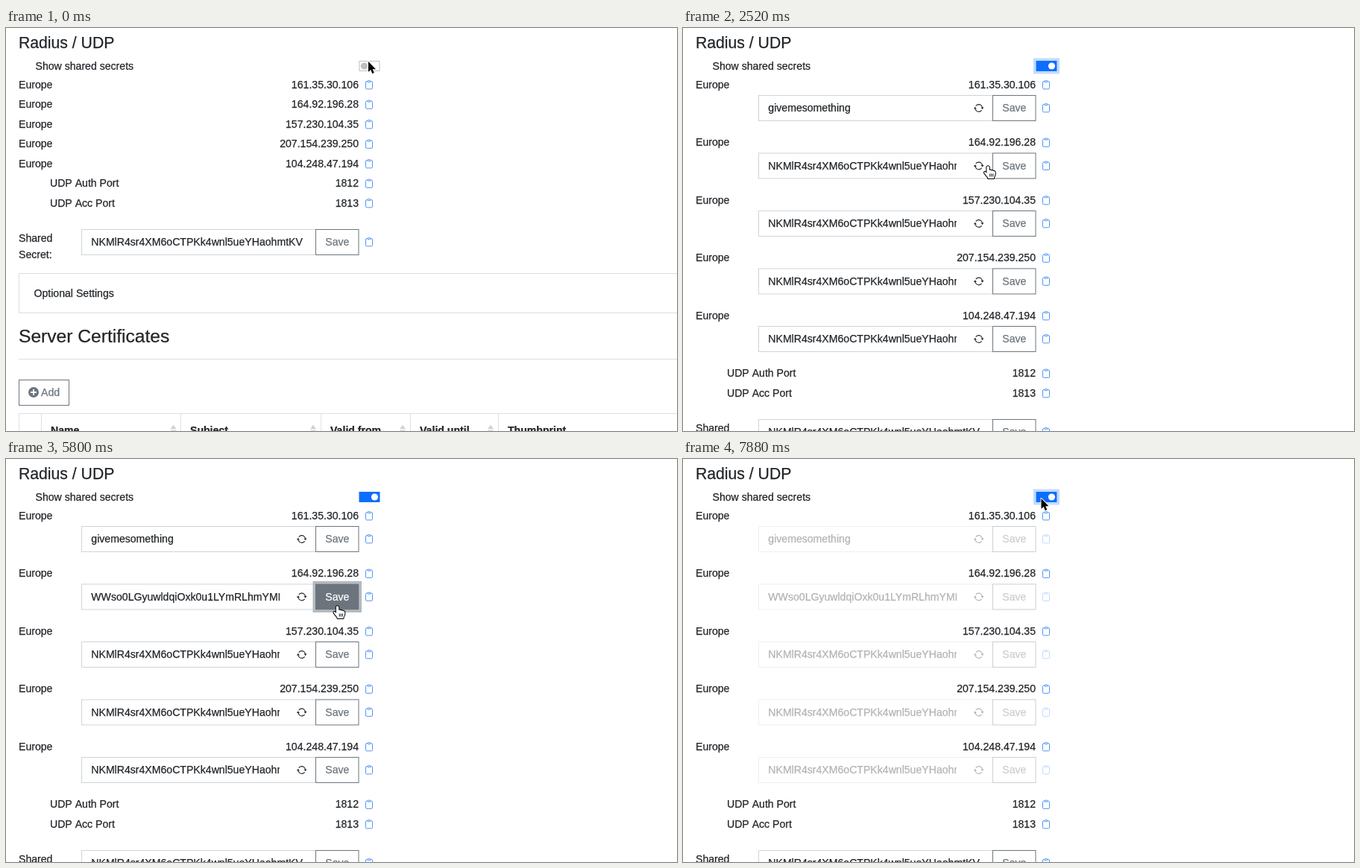
These frames come from a looping animation (900 px wide and 541 px high, 8000 ms). An HTML page with a canvas:

```html
<!DOCTYPE html>
<html lang="en">
<head>
<meta charset="utf-8">
<title>Radius shared secrets</title>
<style>
html, body { margin: 0; width: 100%; height: 100%; overflow: hidden; background: #fff; }
canvas { display: block; width: 900px; height: 541px; }
</style>
</head>
<body>
<canvas id="stage"></canvas>
<script>
const W = 900, H = 541, LOOP = 8000;
const canvas = document.getElementById('stage');
const g = canvas.getContext('2d');
const dpr = window.devicePixelRatio || 1;
canvas.width = W * dpr;
canvas.height = H * dpr;

const INK = '#212529', GREY = '#6c757d', BLUE = '#0d6efd', LINE = '#ced4da', PALE = '#dee2e6';
const BLUE_RING = '#c2dbfe', GREY_RING = '#b5babe';
const SECRET = 'NKMlR4sr4XM6oCTPKk4wnl5ueYHaohmtKV';
const FRESH = 'WWso0LGyuwldqiOxk0u1LYmRLhmYMBkT';
const HOSTS = ['161.35.30.106', '164.92.196.28', '157.230.104.35', '207.154.239.250', '104.248.47.194'];

// Moments of the interaction, in ms
const OPEN = 740, RENEW = 2970, FOCUS = 4320, SELECT = 4460;
const HOVER = 5504, SAVE = 5652, CLOSE = 6400, REOPEN = 7880;

// Pointer moves: start, end, number of steps, way points
const MOVES = [
  [0, 0, 1, [[486, 45, arrow]]],
  [290, 440, 2, [[484, 48, arrow], [483, 51, arrow]]],
  [1480, 2520, 8, [[482, 47, arrow], [470, 33, arrow], [400, 110, beam], [352, 175, beam], [409, 185, hand]]],
  [2670, 3270, 5, [[407, 187, hand], [401, 186, hand]]],
  [3870, 4020, 2, [[335, 225, arrow], [264.5, 267, beam]]],
  [5060, 5800, 6, [[275, 262, beam], [395, 222, arrow], [441, 200, hand], [444.5, 197, hand]]],
  [6840, 7880, 8, [[446, 190, arrow], [470, 120, arrow], [486, 60, arrow], [480.5, 53, arrow]]]
];

// Baselines sit on whole pixels; a hairline stroke gives the heavier text weight
function text(str, x, y, { size = 14.1, color = INK, align = 'left', bold = false } = {}) {
  g.font = `${bold ? 'bold ' : ''}${size}px "Liberation Sans", Arial, sans-serif`;
  g.fillStyle = g.strokeStyle = color;
  g.lineWidth = 0.25;
  g.textAlign = align;
  g.fillText(str, x, Math.floor(y));
  g.strokeText(str, x, Math.floor(y));
}

function fill(x, y, w, h, color) {
  g.fillStyle = color;
  g.fillRect(x, y, w, h);
}

function frame(x, y, w, h, color) {
  g.strokeStyle = color;
  g.lineWidth = 1;
  g.strokeRect(x, y, w, h);
}

function disc(x, y, r, color) {
  g.fillStyle = color;
  g.beginPath();
  g.arc(x, y, r, 0, Math.PI * 2);
  g.fill();
}

function poly(points, color) {
  g.fillStyle = color;
  g.beginPath();
  points.forEach(([x, y]) => g.lineTo(x, y));
  g.closePath();
  g.fill();
}

// Band around a box, leaving the inside untouched
function ring(x, y, w, h, color) {
  g.strokeStyle = color;
  g.lineWidth = 3.5;
  g.strokeRect(x - 1.75, y - 1.75, w + 3.5, h + 3.5);
}

function at(x, y, draw) {
  g.save();
  g.translate(x, y);
  draw();
  g.restore();
}

function clipboard(y) {
  at(487, y + 0.5, () => {
    g.strokeStyle = '#3c8afd';
    g.lineWidth = 0.9;
    g.beginPath();
    g.roundRect(-4.5, -4.8, 9, 10.2, 1.3);
    g.stroke();
    g.beginPath();
    g.roundRect(-2, -5.8, 4, 2, 0.6);
    g.fillStyle = '#fff';
    g.fill();
    g.stroke();
  });
}

function refresh(y) {
  at(396.7, y, () => {
    g.strokeStyle = INK;
    g.lineWidth = 1.1;
    for (let i = 0; i < 2; i++) {
      g.beginPath();
      g.arc(0, 0, 4.9, -2.5, -0.2);
      g.stroke();
      poly([[2.9, -0.9], [6.8, -0.9], [4.85, 1.7]], INK);
      g.rotate(Math.PI);
    }
  });
}

function saveButton(y, active, focused) {
  fill(415, y, 58.5, 35, active ? GREY : '#fff');
  frame(415.5, y + 0.5, 57.5, 34, GREY);
  text('Save', 444.3, y + 22.5, { color: active ? '#fff' : GREY, align: 'center' });
  if (focused) ring(415, y, 58.5, 35, GREY_RING);
}

function inputText(str, y, right) {
  g.save();
  g.beginPath();
  g.rect(112, y, right - 112, 35);
  g.clip();
  text(str, 114.3, y + 22.5);
  g.restore();
}

function toggle(on, focused) {
  if (focused) ring(473.5, 44, 28, 14, BLUE_RING);
  if (on) fill(473.5, 44, 28, 14, BLUE);
  else frame(474, 44.5, 27, 13, '#bfbfbf');
  disc(on ? 494.5 : 480.5, 51, 4.6, on ? '#fff' : '#bfbfbf');
}

function secretRow(i, t) {
  const y = 90 + 77.5 * i, mid = y + 17.5;
  const focused = i === 2 && t >= FOCUS && t < SAVE;
  const selected = focused && t >= SELECT;
  frame(101.5, y + 0.5, 314, 34, LINE);
  if (focused) {
    ring(101.5, y, 278.5, 35, BLUE_RING);
    frame(101.5, y + 0.5, 278, 34, '#86b7fe');
  }
  if (selected) fill(114.5, y + 8, 252.5, 19, '#b3d7fe');
  inputText(i === 1 && t >= RENEW ? FRESH : i === 0 ? 'givemesomething' : SECRET, y, 367);
  if (selected) for (let x = 116; x < 367; x += 3) disc(x, y + 24, 0.95, '#f0383c');
  refresh(mid);
  saveButton(y, i === 1 && t >= HOVER && t < CLOSE, i === 1 && t >= SAVE && t < CLOSE);
  if (i === 1 && t >= RENEW && t < FOCUS) ring(380, y, 36, 35, BLUE_RING);
  clipboard(mid - 0.5);
}

function lowerPart() {
  ['UDP Auth Port', 'UDP Acc Port'].forEach((label, i) => {
    const y = 208.5 + 26.5 * i;
    text(label, 59, y + 5);
    text(1812 + i, 473, y + 5, { align: 'right' });
    clipboard(y);
  });
  text('Shared', 17, 287);
  text('Secret:', 17, 309.5);
  frame(101.5, 270.5, 314, 34, LINE);
  inputText(SECRET, 270, 404);
  saveButton(270, false, false);
  clipboard(287);

  frame(17.5, 329.5, 900, 53, '#dcdddf');
  text('Optional Settings', 37.5, 361);
  text('Server Certificates', 17, 422, { size: 24.6 });
  fill(17, 444, 883, 1, '#dcdddf');

  frame(17.5, 472.5, 67, 34, GREY);
  disc(37, 489, 7, GREY);
  fill(33, 488, 8, 2, '#fff');
  fill(36, 485, 2, 8, '#fff');
  text('Add', 47, 494, { color: GREY });

  fill(17, 517, 883, 1, PALE);
  [17, 47, 234, 422, 542, 660].forEach(x => fill(x, 517, 1, 60, PALE));
  const heads = [['Name', 60], ['Subject', 247], ['Valid from', 435], ['Valid until', 555], ['Thumbprint', 673]];
  heads.forEach(([label, x]) => text(label, x, 545, { bold: true }));
  [224.5, 412, 532, 650].forEach(x => {
    poly([[x - 4, 538.5], [x + 4, 538.5], [x, 532.5]], '#d3d3d3');
    poly([[x - 4, 540], [x + 4, 540], [x, 546]], '#d3d3d3');
  });
}

function outlined(path, body, edge, width) {
  g.lineJoin = 'round';
  g.strokeStyle = edge;
  g.lineWidth = width;
  g.stroke(path);
  g.fillStyle = body;
  g.fill(path);
}

function arrow() {
  outlined(new Path2D('M0 0V14L3.2 11.1L5.3 16.2L7.8 15.1L5.7 10.2H10Z'), '#000', '#fff', 1.8);
}

function hand() {
  outlined(new Path2D('M-1.7 1.5Q0 -1 1.7 1.5L1.9 6Q3.5 4.6 4.6 6.5Q6.3 5.5 7.3 7.2Q9.6 6.6 9.8 9V11Q9.4 14 8 15.4V17H0V15.8Q-2 13.5 -4.8 9.8Q-5.6 7.6 -3.5 8L-1.6 10Z'), '#fff', '#000', 2);
  [2.3, 4.4, 6.5].forEach(x => fill(x, 10.5, 0.9, 4, '#000'));
}

function beam() {
  const path = new Path2D('M-3 -7.5Q0 -7.5 0 -5.5Q0 -7.5 3 -7.5M0 -5.5V5.5M-3 7.5Q0 7.5 0 5.5Q0 7.5 3 7.5M-2 2H2');
  for (const [color, width] of [['#fff', 2.6], ['#000', 1.2]]) {
    g.strokeStyle = color;
    g.lineWidth = width;
    g.stroke(path);
  }
}

function pointer(t) {
  const [start, end, n, pts] = MOVES.filter(m => t >= m[0]).pop();
  const gap = (end - start) / Math.max(1, n - 1);
  const step = gap ? Math.min(n - 1, Math.floor((t - start) / gap + 0.01)) : 0;
  const u = n > 1 ? step / (n - 1) * (pts.length - 1) : 0;
  const i = Math.min(pts.length - 1, Math.floor(u + 1e-6));
  const a = pts[i], b = pts[Math.min(i + 1, pts.length - 1)], f = Math.max(0, u - i);
  at(a[0] + (b[0] - a[0]) * f, a[1] + (b[1] - a[1]) * f, a[2]);
}

// Rows fade in by four visible steps
function fade(t) {
  const age = t - (t >= REOPEN ? REOPEN : OPEN);
  return [0.35, 0.8, 0.97][Math.floor(age / 150)] ?? 1;
}

function draw(t) {
  const open = t >= REOPEN || (t >= OPEN && t < CLOSE);
  g.setTransform(dpr, 0, 0, dpr, 0, 0);
  fill(0, 0, W, H, '#fff');
  text('Radius / UDP', 17, 27.5, { size: 21.2 });
  text('Show shared secrets', 39.5, 56);
  toggle(open, open && (t < RENEW || t >= REOPEN));
  HOSTS.forEach((host, i) => {
    const y = 76 + (open ? 77.5 : 26.5) * i;
    text('Europe', 17, y + 5);
    text(host, 473, y + 5, { align: 'right' });
    clipboard(y);
  });
  if (open) {
    HOSTS.forEach((_, i) => secretRow(i, t));
    // Veil only the secret boxes
    g.globalAlpha = 1 - fade(t);
    HOSTS.forEach((_, i) => fill(97, 89 + 77.5 * i, 400, 37, '#fff'));
    g.globalAlpha = 1;
  }
  at(0, open ? 255 : 0, lowerPart);
  pointer(t);
}

const begin = performance.now();
function tick() {
  draw((performance.now() - begin) % LOOP);
  requestAnimationFrame(tick);
}
tick();
</script>
</body>
</html>
```
